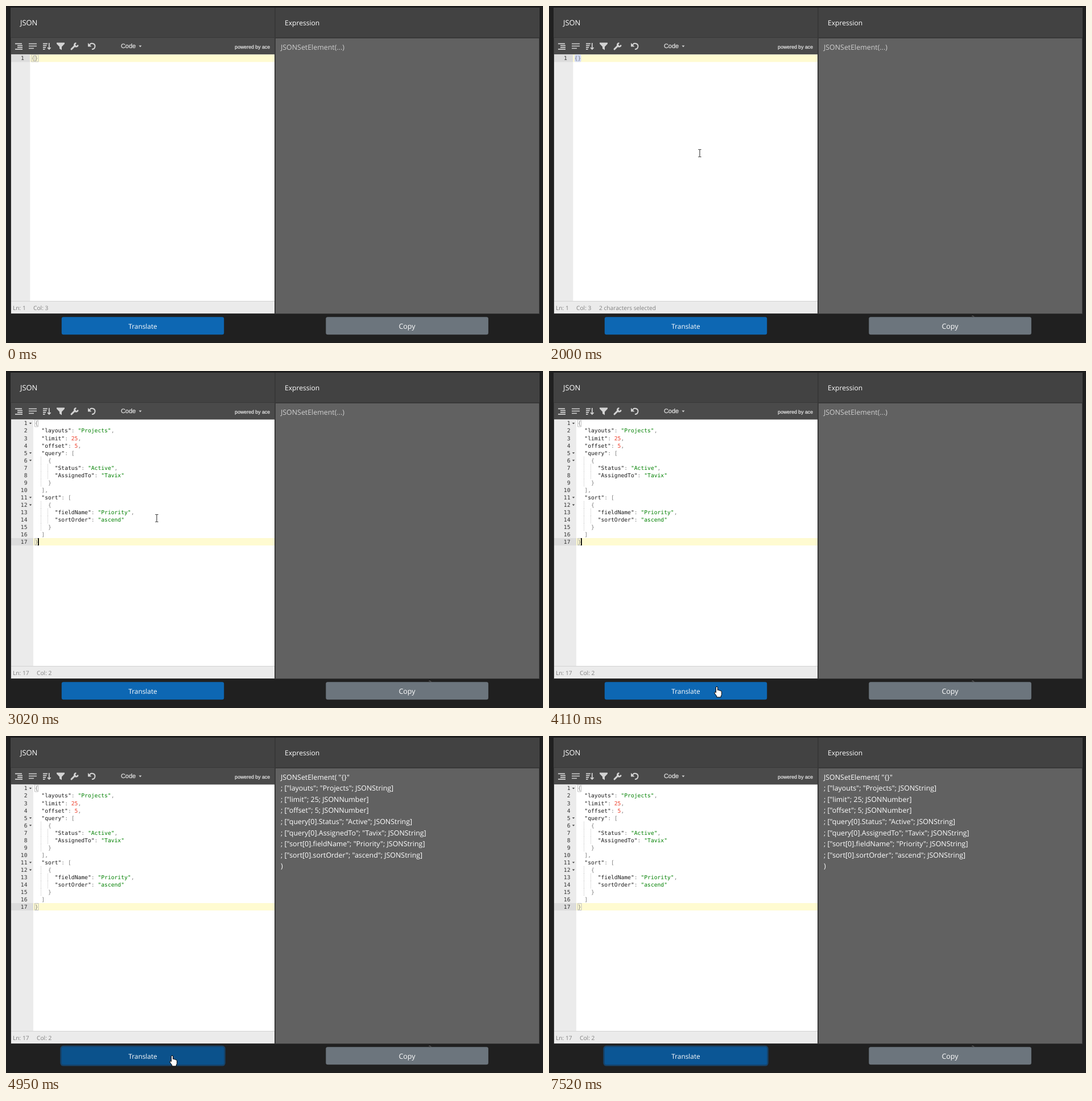
An HTML page that plays this animation: 944 by 593 pixels, repeating every 7590 ms.

```html
<!DOCTYPE html>
<html lang="en">
<head>
<meta charset="utf-8">
<title>JSON to expression</title>
<style>
  html, body { margin: 0; width: 100%; height: 100%; overflow: hidden; background: #202020; }
  svg { display: block; width: 944px; height: 593px; }
  text { white-space: pre; text-rendering: geometricPrecision; }
  .ui { font-family: "Open Sans", "Noto Sans", sans-serif; fill: #fff; }
  .bar { font-family: "Liberation Sans", Arial, sans-serif; fill: #dcdcdc; stroke: #dcdcdc; stroke-width: .3; }
  .status { font-size: 10.2px; fill: #808080; }
  .out { font-size: 12.4px; }
  .code { font: 9.69px "DejaVu Sans Mono", monospace; fill: #808080; }
  .num { fill: #333; text-anchor: end; }
  .key { fill: #1a1a1a; }
  .str { fill: #008000; }
  .val { fill: #ee422e; }
  .mid { text-anchor: middle; }
  .match { fill: none; stroke: #c0c0c0; }
  .guide { stroke: #c4c4c4; stroke-dasharray: 1 1; }
  .icon { fill: none; stroke: #d3d3d3; stroke-width: 1.7; }
  .solid { fill: #d3d3d3; stroke: none; }
</style>
</head>
<body>
<svg viewBox="0 0 944 593">
  <rect width="944" height="2" fill="#1b1b1b"/>
  <rect x="8" y="3" width="930" height="539" fill="#383838"/>
  <path d="M8 3H472V55H8ZM474 3H938V55H474Z" fill="#424242"/>
  <rect x="9" y="56" width="463" height="29.5" fill="#4a4a4a"/>
  <rect x="474" y="57" width="463" height="484" fill="#616161"/>
  <text class="ui" x="25" y="34.3" font-size="12.9">JSON</text>
  <text class="ui" x="490" y="34.3" font-size="12.1">Expression</text>

  <g class="icon">
    <path d="M16 66.3H28M20 69.6H29M20 72.9H29M16 76.2H29"/>
    <path d="M40 66.5H54M40 70.5H54M40 74.5H49"/>
    <path d="M65 66.3H73M65 69.6H71.5M65 72.9H70M65 76.2H68.5M75.8 65V75.5M73 73.2L75.8 76L78.6 73.2"/>
    <path class="solid" d="M89 64.5H103V66.5L98 71.8V77.5L94 75V71.8L89 66.5Z"/>
    <path d="M115 76L121.5 69.5" stroke-width="3" stroke-linecap="round"/>
    <path d="M123.4 65.5A3 3 0 1 0 126.3 68.6" stroke-width="2.6"/>
    <path d="M147 68.6A5 5 0 1 1 151 75.9" stroke-width="2"/>
    <path class="solid" d="M144 65V71.5H150.5Z"/>
    <path class="solid" d="M233.5 69.6H238.5L236 72.6Z"/>
  </g>
  <text class="bar" x="202" y="74" font-size="10.9">Code</text>
  <text class="bar" x="402.3" y="75" font-size="8.75">powered by ace</text>

  <rect x="9" y="85.4" width="463" height="434.6" fill="#fff"/>
  <g id="empty">
    <rect x="9" y="85.4" width="33.3" height="434.6" fill="#ebebeb"/>
    <rect x="9" y="85.4" width="33.3" height="13.1" fill="#dcdcdc"/>
    <rect x="42.3" y="85.4" width="429.7" height="13.1" fill="#fffbd1"/>
    <rect id="selection" x="44.8" y="85.4" width="11.7" height="13.1" rx="2" fill="#d5ddf6"/>
    <path id="pair" class="match" d="M44.5 86H50.5V98H44.5ZM51 86H57V98H51Z"/>
    <text class="code num" x="31.8" y="95.4">1</text>
    <text class="code" x="44.8" y="95.4">{}</text>
  </g>
  <g id="full">
    <rect x="9" y="85.4" width="39" height="434.6" fill="#ebebeb"/>
    <rect x="9" y="294" width="39" height="13" fill="#dcdcdc"/>
    <rect x="48" y="294" width="424" height="13" fill="#fffbd1"/>
    <path class="match" d="M50.5 86H56.5V98H50.5ZM50.5 294.5H57V306.5H50.5Z"/>
  </g>
  <rect id="caret" x="56" width="1.8" height="13" fill="#000"/>

  <rect x="9" y="519.5" width="463" height="21.5" fill="#ebebeb"/>
  <path d="M9 519.5H472" stroke="#d3d3d3"/>
  <text id="line" class="ui status" x="12" y="535"></text>
  <text id="col" class="ui status" y="535"></text>
  <text id="count" class="ui status" x="88" y="535">2 characters selected</text>

  <g id="output"></g>

  <rect id="ring" x="95.3" y="544.8" width="290.4" height="36" rx="5.5" fill="#0d67b3" fill-opacity=".5"/>
  <rect id="translate" x="97.8" y="547.3" width="285.4" height="31" rx="3.3"/>
  <text class="ui mid" x="240.5" y="567.6" font-size="11.85">Translate</text>
  <rect id="copy" x="562.3" y="547.3" width="285.6" height="31" rx="3.3"/>
  <text class="ui mid" x="705" y="567.6" font-size="12.5">Copy</text>
  <path id="speck" d="M743.5 545.5H745.5L747.5 547" fill="none" stroke="#777"/>

  <circle id="click" r="10" fill="#ff0" fill-opacity=".5"/>
  <g id="cursor">
    <path id="beam" d="M-2.5 -6.5H-.8L0 -5.8L.8 -6.5H2.5M0 -5.8V5.8M-2.5 6.5H-.8L0 5.8L.8 6.5H2.5" fill="none" stroke="#222"/>
    <path id="arrow" d="M0 0V14L3.2 11L5.4 16L7.6 15L5.4 10.2H10Z" fill="#fff" stroke="#000" stroke-width=".8"/>
    <path id="hand" d="M-1.5 10V1Q-1.5 -.7 0 -.7T1.5 1V5.5Q3.5 4.6 4.1 6.2Q6 5.5 6.5 7Q8.5 6.6 8.5 8.7V12.5Q8.5 14.5 7.2 16V18H-.2V16.2L-4 11Q-4.5 8.6 -2.8 8.8Z" fill="#fff" stroke="#000"/>
  </g>
</svg>
<script>
const LOOP = 7590;
const SVG = 'http://www.w3.org/2000/svg';
const $ = id => document.getElementById(id);
const show = (id, on) => $(id).style.display = on ? '' : 'none';
const within = (t, spans) => spans.some(([a, b]) => t >= a && t < b);
const latest = (t, keys) => keys.reduce((last, key) => key[0] <= t ? key : last);

function add(parent, tag, attrs, text = '') {
  const el = document.createElementNS(SVG, tag);
  for (const name in attrs) el.setAttribute(name, attrs[name]);
  el.textContent = text;
  return parent.appendChild(el);
}

const data = {
  layouts: 'Projects', limit: 25, offset: 5,
  query: [{ Status: 'Active', AssignedTo: 'Tavix' }],
  sort: [{ fieldName: 'Priority', sortOrder: 'ascend' }]
};

function drawCode() {
  const full = $('full'), left = 50.7, charWidth = 5.833;
  JSON.stringify(data, null, 2).split('\n').forEach((line, i) => {
    const top = 85.4 + 13.05 * i, y = top + 10;
    const indent = line.search(/\S/);
    add(full, 'text', { class: 'code num', x: 37.5, y }, i + 1);
    if (/[{[]$/.test(line)) {
      add(full, 'path', { d: `M40.8 ${top + 5.6}h4.4l-2.2 2.6z`, fill: '#444' });
    }
    for (let c = 2; c < indent; c += 2) {
      add(full, 'path', { class: 'guide', d: `M${Math.round(left + c * charWidth) - .5} ${top}v13` });
    }
    const text = add(full, 'text', { class: 'code', x: left + indent * charWidth, y });
    for (const part of line.trim().match(/"[^"]*"|\d+|[^"\d]+/g)) {
      const kind = part[0] === '"' ? (line.includes(part + ':') ? 'key' : 'str')
        : /\d/.test(part) ? 'val' : '';
      add(text, 'tspan', { class: kind }, part);
    }
  });
}

function flatten(value, path) {
  if (typeof value !== 'object') {
    const type = typeof value === 'number' ? 'JSONNumber' : 'JSONString';
    return [`; ["${path}"; ${JSON.stringify(value)}; ${type}]`];
  }
  return Object.entries(value).flatMap(([key, child]) =>
    flatten(child, Array.isArray(value) ? `${path}[${key}]` : path ? `${path}.${key}` : key));
}

function setOutput(lines, fill) {
  const box = $('output');
  box.textContent = '';
  lines.forEach((line, i) =>
    add(box, 'text', { class: 'ui out', x: 483, y: 76.6 + 19.6 * i, style: `fill:${fill}` }, line));
}

const result = ['JSONSetElement( "{}"', ...flatten(data, ''), ')'];

// time, x, y, shape
const moves = [
  [0, 0, 0, ''],
  [210, 744, 546, 'hand'], [290, 660, 490, 'beam'], [370, 535, 408, 'beam'],
  [450, 410, 330, 'beam'], [530, 325, 286, 'beam'], [610, 280, 265, 'beam'],
  [690, 265, 259, 'beam'],
  [3650, 266, 264, 'beam'], [3730, 268, 288, 'beam'], [3800, 273, 342, 'beam'],
  [3880, 280, 420, 'beam'], [3960, 287, 492, 'beam'], [4030, 293, 535, 'arrow'],
  [4110, 295, 556, 'hand'], [4190, 293, 561, 'hand'], [4270, 292, 563, 'hand'],
  [6190, 0, 0, '']
];
const blinks = [[1300, 1850], [2320, 2850], [3020, 3650], [4110, 4630]];
const copyFill = [[0, '#6c757d'], [210, '#5e666d'], [290, '#656d74'], [370, '#6c757d']];
const blueFill = [[0, '#0d67b3'], [4190, '#0c5d9f'], [4270, '#0b528c'], [7520, '#0b5695']];

let translated;

function render(t) {
  const pasted = t >= 3020, selected = t >= 2000 && !pasted, done = t >= 4950;
  show('empty', !pasted);
  show('full', pasted);
  show('selection', selected);
  show('pair', !selected);
  show('count', selected);
  show('caret', within(t, blinks));
  $('caret').setAttribute('y', pasted ? 294 : 85.5);
  $('line').textContent = pasted ? 'Ln: 17' : 'Ln: 1';
  $('col').textContent = pasted ? 'Col: 2' : 'Col: 3';
  $('col').setAttribute('x', pasted ? 54 : 48);

  if (done !== translated) {
    translated = done;
    setOutput(done ? result : ['JSONSetElement(...)'], done ? '#fff' : '#cfcfcf');
  }

  $('copy').setAttribute('fill', latest(t, copyFill)[1]);
  $('translate').setAttribute('fill', latest(t, blueFill)[1]);
  show('ring', t >= 4880);
  $('ring').setAttribute('opacity', done ? 1 : .5);
  show('speck', t >= 290);

  const [, x, y, shape] = latest(t, moves);
  for (const name of ['beam', 'arrow', 'hand']) show(name, name === shape);
  $('cursor').setAttribute('transform', `translate(${x} ${y})`);
  show('click', within(t, [[1220, 1380], [4800, 4950]]));
  $('click').setAttribute('transform', pasted ? 'translate(292 562.5)' : 'translate(263.5 258.5)');
}

drawCode();
(function frame() {
  render(performance.now() % LOOP);
  requestAnimationFrame(frame);
})();
</script>
</body>
</html>
```
